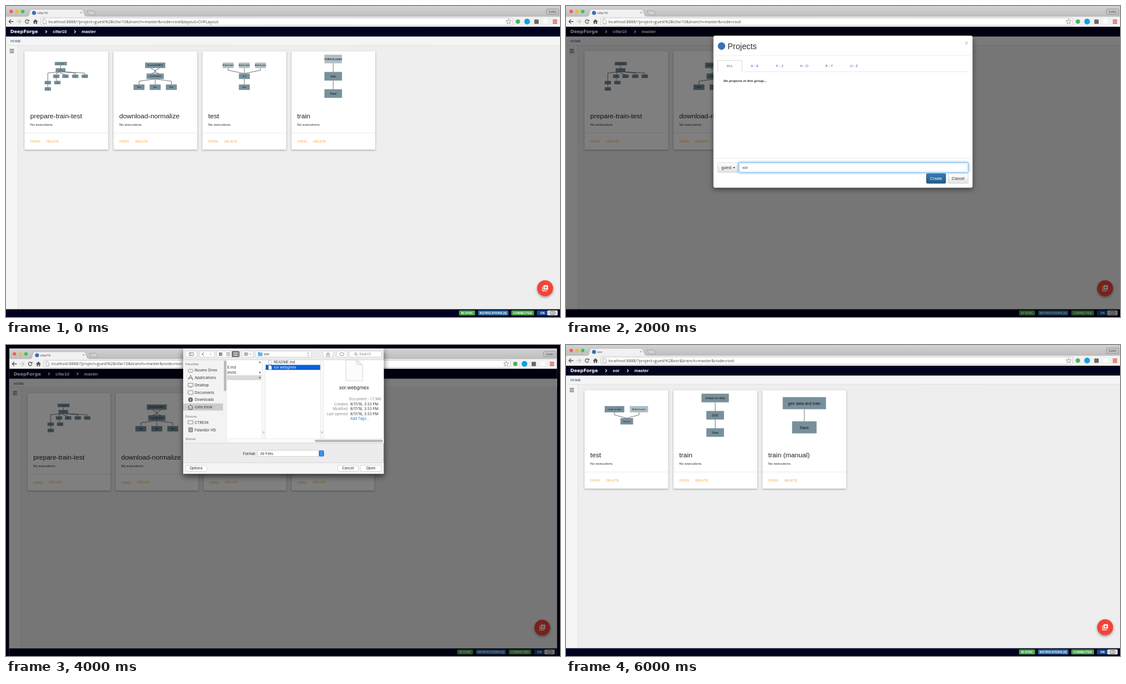
Recreate the animation shown at these times as an HTML page with a canvas. Size 960 px wide and 540 px high, loop 7000 ms.

```html
<!DOCTYPE html>
<html lang="en">
<head>
<meta charset="utf-8">
<title>Importing a project</title>
<style>
  html, body { margin: 0; width: 100%; height: 100%; overflow: hidden; }
  canvas { display: block; }
</style>
</head>
<body>
<canvas id="stage" width="960" height="540"></canvas>
<script>
const ctx = document.getElementById("stage").getContext("2d");
const SANS = "'Liberation Sans', Arial, sans-serif";
const OPEN = "'Open Sans', sans-serif";
const INTER = "Inter, sans-serif";
const WIDE = "'DejaVu Sans', sans-serif";
const NAVY = "#00031f", LINK = "#2457a0", DARK = "#78909c", LIGHT = "#b0bec5";

// ---------- drawing helpers ----------
function box(x, y, w, h, fill, stroke, r = 0) {
  ctx.beginPath();
  ctx.roundRect(x, y, w, h, r);
  if (fill) { ctx.fillStyle = fill; ctx.fill(); }
  if (stroke) { ctx.strokeStyle = stroke; ctx.lineWidth = 0.7; ctx.stroke(); }
}
function dot(x, y, r, fill) {
  ctx.beginPath();
  ctx.arc(x, y, r, 0, 7);
  ctx.fillStyle = fill;
  ctx.fill();
}
function poly(points, stroke, width = 0.7, fill) {
  ctx.beginPath();
  points.forEach(([x, y]) => ctx.lineTo(x, y));
  if (fill) { ctx.fillStyle = fill; ctx.fill(); }
  if (stroke) { ctx.strokeStyle = stroke; ctx.lineWidth = width; ctx.stroke(); }
}
const rule = (x, y, w, color) => poly([[x, y], [x + w, y]], color);

// y is the middle of the capitals
function text(s, x, y, size, color, { font = SANS, style = "", align = "left" } = {}) {
  ctx.font = `${style} ${size}px ${font}`;
  ctx.textAlign = align;
  ctx.fillStyle = color;
  ctx.fillText(s, x, y + size * 0.36);
}
function shadowed(blur, dy, alpha, draw) {
  ctx.save();
  ctx.shadowBlur = blur;
  ctx.shadowOffsetY = dy;
  ctx.shadowColor = `rgba(0,0,0,${alpha})`;
  draw();
  ctx.restore();
}
function shade(y, h, top, bottom) {
  const g = ctx.createLinearGradient(0, y, 0, y + h);
  g.addColorStop(0, top);
  g.addColorStop(1, bottom);
  return g;
}
const chevron = (x, y, r, color, w = 1) => poly([[x - r / 2, y - r], [x + r / 2, y], [x - r / 2, y + r]], color, w);

// ---------- pipelines: nodes are [x, y, w, h, label, light] ----------
const CIFAR = [
  { title: "prepare-train-test",
    nodes: [[95, 100, 21, 6, "GetTrainData"], [94.5, 111, 17, 6, "Partition"], [87, 122, 11, 6, "Data"], [103, 122, 11, 6, "Data"],
      [120, 122, 11, 6, "Data"], [136.5, 122, 11, 6, "Data"], [72.5, 133, 11, 6, "Split"], [89, 133, 11, 6, "Save"], [72.5, 144, 11, 6, "Save"]],
    links: [[0, 1], [1, 2], [1, 3], [1, 4], [1, 5], [1, 6], [2, 7], [6, 8]] },
  { title: "download-normalize",
    nodes: [[258.5, 103, 35, 9.5, "DownloadCIFAR10"], [258.5, 122, 30, 9.5, "normalizeData"], [230.5, 141, 19, 9.5, "Save"],
      [258.5, 141, 19, 9.5, "Save"], [286.5, 141, 19, 9.5, "Save"]],
    links: [[1, 2], [1, 3], [1, 4]],
    extra: [[[251, 108], [260, 113], [258.5, 115], [251, 117.5]], [[266, 108], [257, 113], [258.5, 115], [266, 117.5]]] },
  { title: "test",
    nodes: [[385, 103, 19, 9.5, "ArtifactLoader", 1], [413, 103, 19, 9.5, "ArtifactLoader", 1], [441, 103, 19, 9.5, "ArtifactLoader", 1],
      [413, 122, 19, 9.5, "test"], [413, 141, 19, 9.5, "Save"]],
    links: [[0, 3], [1, 3], [2, 3], [3, 4]] },
  { title: "train",
    nodes: [[567, 92, 30.5, 15, "ArtifactLoader", 1], [567, 122, 30.5, 15, "train"], [567, 152, 30.5, 15, "Save"]],
    links: [[0, 1], [1, 2]] },
];
const XOR = [
  { title: "test",
    nodes: [[84, 111.5, 34, 11, "create xor data"], [126.5, 111.5, 31.5, 11, "ArtifactLoader", 1], [105.3, 132.5, 22, 11, "test xor"]],
    links: [[0, 2], [1, 2]] },
  { title: "train",
    nodes: [[258.5, 92, 47.5, 15, "create xor data"], [258.5, 122, 30.5, 15, "SGD"], [258.5, 152, 30.5, 15, "Save"]],
    links: [[0, 1], [1, 2]] },
  { title: "train (manual)",
    nodes: [[413, 101, 75, 21, "gen data and train"], [413, 143, 42.5, 21, "Save"]],
    links: [[0, 1]] },
];

function card({ title, nodes, links, extra = [] }, i) {
  const x = 32 + i * 154.2, mid = x + 72.7;
  shadowed(3, 1, 0.35, () => box(x, 78.5, 145.3, 171, "#fff", null, 1));
  for (const [a, b] of links) {
    const [ax, ay, , h] = nodes[a], [bx, by, , bh] = nodes[b];
    const bend = Math.abs(ax - mid) > Math.abs(bx - mid) ? ax : bx;
    const start = ay + h / 2;
    poly([[ax, start], [bend, start + h * 0.4], [bx, by - bh / 2]], "#555", 0.8);
  }
  extra.forEach(p => poly(p, "#555", 0.8));
  for (const [nx, ny, w, h, label, light] of nodes) {
    box(nx - w / 2, ny - h / 2, w, h, light ? LIGHT : DARK);
    text(label, nx, ny, h / 3, "#111", { align: "center" });
  }
  text(title, x + 10, 190.5, 11.7, "#222");
  text("No executions", x + 10, 206, 6.1, "#333");
  rule(x, 220.5, 145.3, "#e4e4e4");
  text("OPEN", x + 10, 235, 5.9, "#ffa13a");
  text("DELETE", x + 38, 235, 5.7, "#ffa13a");
}

// ---------- browser and page ----------
function browser(project, query) {
  box(0, 0, 960, 19, shade(0, 18, "#d2d2d2", "#bebebe"));
  ["#fc5b57", "#e5bf3c", "#34c84a"].forEach((c, i) => dot(9 + i * 10, 9.5, 3, c));
  box(0, 18, 960, 18, "#f1f1f1");
  rule(0, 18, 960, "#a9a9a9");
  poly([[36, 18.5], [39, 17], [42, 7], [44, 5.8], [131, 5.8], [133, 7], [137, 17], [140, 18.5]], "#a9a9a9", 0.7, "#f1f1f1");
  box(36, 18.2, 104, 1.5, "#f1f1f1");
  dot(48.5, 12, 3.5, "#3c6fb5");
  text(project, 54, 12, 5.8, "#333", { font: OPEN });
  text("×", 130, 12, 6.5, "#777", { align: "center" });
  poly([[140.5, 8.5], [152, 8.5], [155.5, 15.2], [144, 15.2], [140.5, 8.5]], "#999", 0.7, "#d0d0d0");
  box(936.5, 5, 21, 9.5, "#c4c4c4", "#888", 1.5);
  text("Colin", 947, 9.8, 5.8, "#333", { font: OPEN, align: "center" });

  poly([[8.5, 23.5], [5.2, 27], [8.5, 30.5]], "#555", 1.4);
  poly([[5.5, 27], [13, 27]], "#555", 1.4);
  poly([[22.5, 23.5], [25.8, 27], [22.5, 30.5]], "#c5c5c5", 1.4);
  poly([[18.5, 27], [25.5, 27]], "#c5c5c5", 1.4);
  ctx.beginPath();
  ctx.arc(36.5, 27, 3, 0.4, 5.4);
  ctx.strokeStyle = "#555";
  ctx.lineWidth = 1.3;
  ctx.stroke();
  poly([[40.3, 23], [40.3, 26.6], [36.8, 26.6]], null, 0, "#555");
  poly([[46.5, 27.2], [51, 23], [55.5, 27.2], [54, 27.2], [54, 31], [51.8, 31], [51.8, 28.3], [50.2, 28.3], [50.2, 31], [48, 31], [48, 27.2]], null, 0, "#555");

  box(60.5, 20.8, 817.5, 12.6, "#fff", "#b5b5b5", 1.5);
  poly([[64, 23.2], [67.5, 23.2], [69.5, 25.2], [69.5, 30.8], [64, 30.8], [64, 23.2]], "#777");
  text("localhost:8888/?project=guest%2B" + project + query, 73.3, 27, 7.05, "#444", { font: OPEN });
  const star = Array.from({ length: 11 }, (_, i) => {
    const a = i * Math.PI / 5, r = i % 2 ? 2 : 4.8;
    return [871 + r * Math.sin(a), 27.2 - r * Math.cos(a)];
  });
  poly(star, "#777");
  dot(887, 27, 3.8, "#4caf64");
  dot(903, 27, 5, "#149fe0");
  box(915.5, 23.5, 7.5, 7.5, "#666");
  box(931, 23, 8, 8, "#fafafa");
  for (let y = 24.3; y < 31; y += 2.7) box(947.5, y - 0.7, 7.5, 1.6, "#dc4437");
}

function footer() {
  box(0, 526.5, 960, 13.5, NAVY);
  const chip = (label, x, w, color) => {
    box(x, 528.6, w, 8.6, color, null, 1.5);
    text(label, x + w / 2, 533, 5.1, "#fff", { style: "bold", align: "center" });
  };
  chip("IN SYNC", 785, 28, "#49a04b");
  chip("NOTIFICATIONS [0]", 818, 52.5, "#2e6da4");
  chip("CONNECTED", 875.5, 39.5, "#49a04b");
  chip("ON", 920, 19, "#164a8c");
  box(938, 528.6, 18, 8.6, "#ddd", null, 1.5);
  box(943.5, 530.5, 7.5, 5, "#eee", "#555", 0.5);
  rule(945, 532, 5, "#777");
  rule(945, 534, 5, "#777");
}

function page(project, cards) {
  box(0, 36, 960, 504, "#eee");
  box(0, 53, 960, 15.5, "#f5f5f5");
  box(0, 68, 20.8, 459, "#f5f5f5");
  rule(0, 68.3, 960, "#dcdcdc");
  poly([[20.8, 68], [20.8, 527]], "#d8d8d8");
  box(0, 36, 960, 17, NAVY);
  const gap = project === "xor" ? 107 : 119.5;
  brand();
  chevron(69.5, 44.6, 2.3, "#fff", 1.2);
  text(project, 81, 44.6, 7.5, "#fff", { style: "bold" });
  chevron(gap, 44.6, 2.3, "#fff", 1.2);
  text("master", gap + 11.5, 44.6, 7.5, "#fff", { style: "bold" });
  text("HOME", 7.5, 61, 6.1, "#1d4373");
  for (let y = 75; y < 82; y += 2.8) box(6.3, y - 0.2, 7.5, 1.2, "#555");
  cards.forEach(card);

  shadowed(4, 2, 0.4, () => dot(934.2, 490, 13.8, "#f44336"));
  poly([[929.8, 487], [929.8, 494.6], [937.4, 494.6]], "#fff", 1.1);
  box(931.4, 484.8, 7.8, 7.8, "#fff", null, 0.7);
  poly([[935.3, 486.2], [935.3, 491.2]], "#f44336", 1.1);
  poly([[932.8, 488.7], [937.8, 488.7]], "#f44336", 1.1);
  footer();
}
const brand = () => text("DeepForge", 7.5, 44.6, 7.8, "#fff", { font: WIDE, style: "bold" });

// ---------- project menu ----------
const RECENT = ("graphTest customLayerImport merging xor cifar10 pipeline nn execDuration longLogs project " +
  "progress brokenJob badMerge critTest nn2 layerInputs layInNN schemas largeFiles canceling").split(" ");

function menu() {
  box(0, 36, 64, 17, "#05295c");
  brand();
  shadowed(5, 2, 0.35, () => box(0, 53, 90.5, 341, "#fff", "#ccc", 1));
  box(0.5, 83, 89.5, 13, "#eee");
  ["Manage", "New", "Import"].forEach((s, i) => text(s + (i ? " project ..." : " projects ..."), 20, 63.7 + i * 13, 7, "#333"));
  poly([[10.5, 66.5], [10.5, 61], [13, 61], [14, 62], [16.5, 62], [16.5, 63.3], [18.5, 63.3], [16.5, 66.8]], null, 0, "#333");
  poly([[13.5, 74], [13.5, 79.5]], "#333", 1.5);
  poly([[10.8, 76.7], [16.3, 76.7]], "#333", 1.5);
  poly([[12.5, 86.5], [14.5, 86.5], [14.5, 88.5], [16, 88.5], [13.5, 91], [11, 88.5], [12.5, 88.5]], null, 0, "#333");
  box(10.5, 91, 6, 1.6, "#333");
  rule(0, 99.7, 90, "#e0e0e0");
  text("RECENT PROJECTS", 3.5, 109, 5.1, "#999", { style: "bold" });
  RECENT.forEach((name, i) => {
    const y = 123.7 + i * 13;
    if (name === "cifar10") box(0.5, y - 6.5, 89.5, 13, "#ecf2fb");
    text(name, 10.5, y, 7, "#333");
    chevron(86.3, y, 1.6, "#999", 0.8);
  });
  text("Show all...", 10.5, 383.7, 7, "#333");
}

// ---------- dialogs ----------
function button(label, x, y, w, primary) {
  const fill = primary ? shade(y, 17, "#337ab7", "#265a88") : shade(y, 17, "#fff", "#e2e2e2");
  box(x, y, w, 17, fill, primary ? "#245580" : "#ccc", 2);
  text(label, x + w / 2, y + 8.5, 7, primary ? "#fff" : "#333", { align: "center" });
}
function modal(x, y, w, h, title, size, line, foot) {
  shadowed(8, 3, 0.5, () => box(x, y, w, h, "#fff", null, 3));
  dot(x + 14, line - 16.5, 6.5, "#3c6fb5");
  text(title, x + (size > 13 ? 24.5 : 22), line - 16.5, size, "#333");
  text("×", x + w - 10.5, 64, 10, "#aaa", { align: "center" });
  rule(x, line, w, "#e5e5e5");
  rule(x, foot, w, "#e5e5e5");
}
function tabs(labels, active, first, y, x, w) {
  rule(x, y + 10, w, "#ddd");
  labels.forEach((s, i) => {
    const mid = first + i * 43;
    if (i === active) {
      box(mid - 21, y - 9.5, 42, 21, "#fff");
      poly([[mid - 21, y + 10], [mid - 21, y - 9.5], [mid + 21, y - 9.5], [mid + 21, y + 10]], "#ccc");
    }
    text(s, mid, y, 6.1, i === active ? "#555" : LINK, { align: "center" });
  });
}
function projectsDialog() {
  modal(255.5, 51.5, 449, 264, "Projects", 14, 86, 264.5);
  tabs(["ALL", "A - E", "F - J", "K - O", "P - T", "U - Z"], 0, 284, 104, 263, 434);
  text("No projects in this group...", 273, 130, 5.9, "#333", { style: "italic bold" });
  button("", 263, 272, 36.5);
  text("guest", 269.5, 280.5, 7, "#333");
  poly([[289.2, 279.8], [293.2, 279.8], [291.2, 282]], null, 0, "#333");
  ctx.save();
  ctx.shadowBlur = 4;
  ctx.shadowColor = "#66afe9";
  box(299.3, 272, 397.7, 17, "#fff", "#66afe9", 1.5);
  ctx.restore();
  text("xor", 305.5, 280.5, 7, "#444");
  button("Create", 624.5, 291, 33.5, true);
  button("Cancel", 662, 291, 35);
}
function importDialog(file) {
  modal(331, 51.5, 298.5, 141.5, "Create new project", 12, 84, 160.5);
  tabs(["Seed", "Duplicate", "Import"], 2, 359, 101, 338, 284);
  text("Import from file", 338, 127.5, 6.8, "#333", { style: "bold" });
  dot(391.7, 126.3, 2.3, "#333");
  ctx.setLineDash([1.5, 1]);
  box(338, 136, 284, 17, "#f6f6f6", "#aaa", 2);
  ctx.setLineDash([]);
  poly([[612, 140], [615.5, 140], [618, 142.5], [618, 148.7], [612, 148.7]], null, 0, LINK);
  if (file) text(file, 342, 143.7, 6.95, LINK);
  ctx.globalAlpha = file ? 1 : 0.35;
  button("Create", 549.5, 168.5, 33.5, true);
  ctx.globalAlpha = 1;
  button("Cancel", 587, 168.5, 35);
}

// ---------- file chooser ----------
function fileChooser() {
  const label = (s, x, y, color = "#333", align = "left", size = 6.2, style = "") => text(s, x, y, size, color, { font: INTER, align, style });
  const pill = (x, y, w, h = 10.5) => box(x, y, w, h, "#fff", "#c8c8c8", 2);
  shadowed(10, 4, 0.6, () => box(307, 6, 347.5, 217.5, "#ececec"));

  [[311, 20], [335, 26.5], [365.5, 39], [409, 19.5], [432, 97.5], [549, 18], [573, 18], [595, 56]].forEach(([x, w]) => pill(x, 10.5, w));
  box(317.5, 13.3, 7, 5, null, "#555");
  poly([[320, 13.3], [320, 18.3]], "#555");
  poly([[342.5, 13], [339.8, 15.8], [342.5, 18.6]], "#444", 1);
  chevron(354.5, 15.8, 2.6, "#bbb");
  box(391, 10.5, 13.5, 10.5, "#6b6b6b", null, 2);
  for (let i = 0; i < 3; i++) {
    box(369.5 + (i % 2) * 3, 13.2, 2.2, 2.2, "#555");
    box(369.5 + (i % 2) * 3, 16.3, 2.2, 2.2, "#555");
    rule(381.5, 13.5 + i * 2.3, 7, "#555");
    box(394 + i * 2.7, 13.2, 2.7, 5.4, null, "#fff");
    box(413 + i * 2.3, 13.3, 1.7, 1.9, "#666");
    box(413 + i * 2.3, 16.3, 1.7, 1.9, "#666");
  }
  poly([[422, 15], [423.5, 16.5], [425, 15]], "#555");
  box(436.5, 13, 8, 6.2, "#5ab8ee", null, 0.8);
  box(436.5, 12.2, 3.5, 2, "#5ab8ee");
  label("xor", 447, 15.9);
  poly([[522, 14.8], [523.5, 13.2], [525, 14.8]], "#555");
  poly([[522, 17], [523.5, 18.6], [525, 17]], "#555");
  box(555.5, 15, 5, 4, null, "#666");
  poly([[558, 17], [558, 12.2]], "#666");
  box(578.5, 13.5, 7, 4.8, null, "#666", 2);
  ctx.beginPath();
  ctx.arc(606, 15.5, 2, 0, 7);
  ctx.stroke();
  poly([[607.4, 17], [609, 18.6]], "#666");
  label("Search", 612, 15.9, "#888");

  box(307, 26, 76, 144, "#f3f3f3");
  box(383, 26, 271.5, 144, "#fff");
  rule(307, 25.8, 347.5, "#ccc");
  box(307, 101.5, 69, 12.2, "#cbcbcb");
  [["Favorites", 32.8], ["Devices", 123.7], ["Shared", 163]].forEach(([s, y]) => label(s, 311, y, "#777", "left", 5.2, "500"));
  ["Nuvero Drive", "Applications", "Desktop", "Documents", "Downloads", "colin.tresk"].forEach((s, i) => {
    const y = 43.7 + i * 12.85;
    if (i === 0) box(315.5, y - 1.5, 9, 5, null, "#666", 2.5);
    else if (i === 1) poly([[316, y + 4], [320, y - 4], [324, y + 4], [322, y + 1], [315.5, y + 1]], "#666", 0.9);
    else if (i === 2) { box(315.5, y - 3, 8.5, 5.5, null, "#666"); rule(317.5, y + 4, 4.5, "#666"); }
    else if (i === 3) box(315.5, y - 3, 8.5, 6.5, null, "#666", 1);
    else if (i === 4) { dot(319.8, y, 4, "#666"); poly([[319.8, y - 2], [319.8, y + 2]], "#fff", 1); }
    else poly([[315.5, y], [319.8, y - 4], [324, y], [322.8, y], [322.8, y + 3.8], [316.8, y + 3.8], [316.8, y], [315.5, y]], "#555", 1);
    label(s, 327, y, "#333", "left", 6.3);
  });
  box(315.5, 131.5, 8.5, 5.5, null, "#666");
  label("CTRESK", 327, 134.5);
  box(316.5, 143.5, 7, 7.5, "#aaa", "#666", 0.8);
  label("Palandor HD", 327, 147.5);
  box(377.6, 27, 4.2, 53, "#b8b8b8", null, 2);

  box(383, 52.4, 59.5, 8.6, "#d9d9d9");
  label("E.md", 383.5, 39);
  label("shots", 383, 47.8);
  [30, 47.8, 56.6].forEach(y => poly([[438.8, y - 1.8], [442, y], [438.8, y + 1.8]], null, 0, "#666"));
  for (const x of [443.5, 544.8]) {
    box(x, 26, 5.5, 136, "#f8f8f8", "#e4e4e4");
    poly([[x + 2, 150], [x + 2, 153.5]], "#aaa");
    poly([[x + 3.7, 150], [x + 3.7, 153.5]], "#aaa");
  }
  box(450, 34.6, 94.5, 8.6, "#0b5fd8");
  [30, 38.9].forEach(y => poly([[455, y - 3.5], [458.3, y - 3.5], [460.3, y - 1.5], [460.3, y + 3.5], [455, y + 3.5], [455, y - 3.5]], "#aaa", 0.6, "#fff"));
  label("README.md", 464, 30);
  label("xor.webgmex", 464, 38.9, "#fff");

  poly([[589, 26], [609, 26], [618, 35], [618, 62], [589, 62], [589, 26]], "#ccc", 0.8, "#fcfcfc");
  poly([[606, 26], [608, 34], [618, 35], [609, 26]], "#ccc", 0.6, "#eee");
  label("xor.webgmex", 603, 74.3, "#222", "center", 8.2);
  label("Document - 1.7 MB", 650, 94, "#888", "right");
  ["Created", "Modified", "Last opened"].forEach((s, i) => {
    label(s, 592, 102.6 + i * 8.5, "#888", "right");
    label("8/17/16, 3:33 PM", 596.5, 102.6 + i * 8.5);
  });
  label("Add Tags...", 596.5, 128, "#1a73e0");
  box(383, 162.5, 271.5, 7.5, "#fafafa", "#e8e8e8");
  box(535, 164.6, 118, 4, "#b8b8b8", null, 2);

  rule(307, 170.3, 347.5, "#d0d0d0");
  label("Format:", 433, 188.3, "#222", "right");
  pill(436, 183, 115);
  label("All Files", 440.5, 188.3);
  box(542, 183, 9, 10.5, "#2a80f0", null, 2);
  poly([[545, 187], [546.5, 185.5], [548, 187]], "#fff");
  poly([[545, 189.5], [546.5, 191], [548, 189.5]], "#fff");
  box(307, 204.5, 347.5, 19, "#f5f5f5");
  rule(307, 204.5, 347.5, "#d0d0d0");
  [["Options", 311, 37], ["Cancel", 575, 35.5], ["Open", 614, 36.5]].forEach(([s, x, w]) => {
    pill(x, 209, w);
    label(s, x + w / 2, 214.2, "#222", "center");
  });
}

// ---------- one scene per second ----------
const ROOT = "&branch=master&node=root", LAYOUT = "&layout=CHFLayout";
const SCENES = [
  { query: ROOT + LAYOUT },
  { query: ROOT + LAYOUT, overlay: menu },
  { query: ROOT, dim: true, overlay: projectsDialog },
  { query: ROOT, dim: true, overlay: () => importDialog() },
  { query: ROOT, dim: true, small: true, overlay: fileChooser },
  { query: ROOT + "&visualizer=ModelEditor&tab=0" + LAYOUT, dim: true, overlay: () => importDialog("xor.webgmex (1.6 MiB)") },
  { project: "xor", cards: XOR, query: ROOT },
];

function render(now) {
  const { project = "cifar10", cards = CIFAR, query, dim, small, overlay } = SCENES[Math.floor(now / 1000) % SCENES.length];
  box(0, 0, 960, 540, "#000010");
  ctx.save();
  if (small) ctx.transform(0.9885, 0, 0, 0.989, 5.8, 6);
  browser(project, query);
  page(project, cards);
  if (dim) box(0, 36, 960, 504, "rgba(0,0,0,.5)");
  ctx.restore();
  if (overlay) overlay();
  requestAnimationFrame(() => render(performance.now()));
}
render(performance.now());
</script>
</body>
</html>
```
